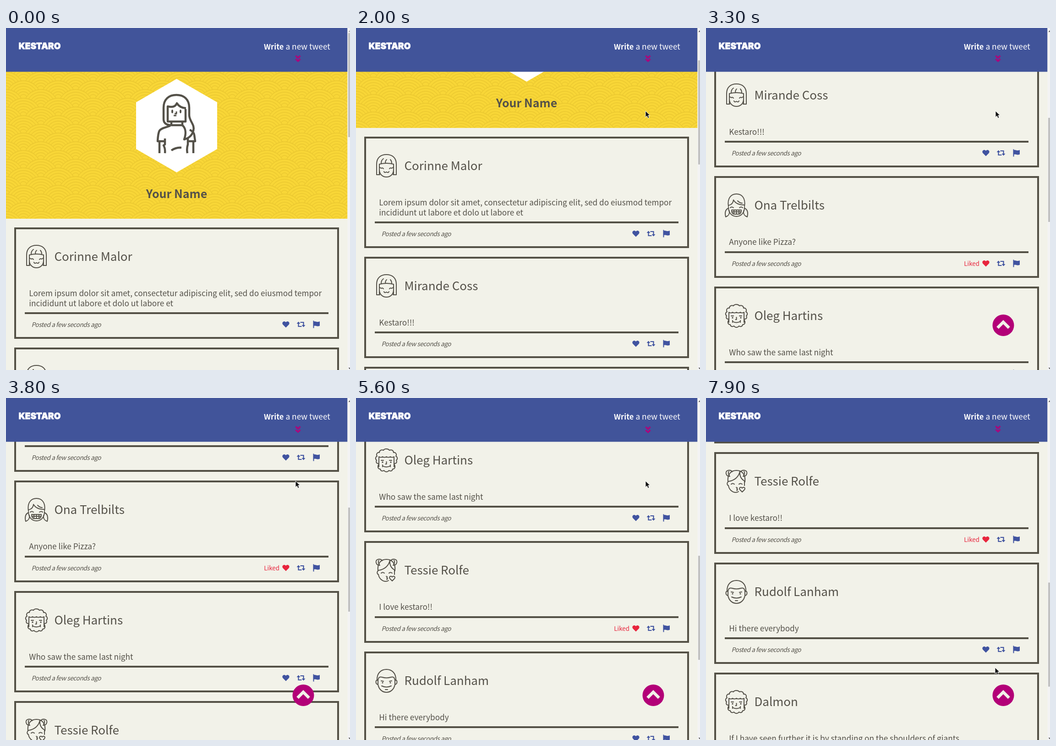
Animation of 751x746 px, one loop 8 s. Source, as an HTML page:

```html
<!DOCTYPE html>
<html lang="en">
<head>
<meta charset="utf-8">
<title>Kestaro</title>
<style>
  html, body { margin: 0; width: 100%; height: 100%; overflow: hidden; background: #f2f2e9; }
  svg { display: block; font-family: "Noto Sans CJK JP", "Noto Sans CJK SC", "Noto Sans CJK", "Source Sans Pro", "Noto Sans", sans-serif; }
  text { fill: #545149; }
  .ink { fill: none; stroke: #545149; stroke-width: 2; stroke-linecap: round; stroke-linejoin: round; }
  .dot { fill: #545149; stroke: none; }
  .bold { font-weight: 700; }
  .name { font-size: 25.95px; }
  .body { font-size: 17.23px; }
  .posted { font-size: 13.6px; font-style: italic; letter-spacing: -.4px; }
  .liked { font-size: 13.4px; fill: #e8253d; }
  .menu { font-size: 17.3px; fill: #fff; }
  .menu.bold { font-size: 16.4px; }
  .brand { font: 900 18.9px Inter, "DejaVu Sans", sans-serif; fill: #fff; stroke: #fff; stroke-width: .8; }
</style>
</head>
<body>
<svg width="751" height="746" viewBox="0 0 751 746">
  <defs>
    <pattern id="waves" width="76" height="38" y="96" patternUnits="userSpaceOnUse"></pattern>

    <g id="bob" class="ink">
      <path d="M11 45H4V22C4 8 13 1 25.500 1S47 8 47 22V45H40M10 45V22Q25.500 18 41 22V45"/>
      <path d="M10 34C10 44 17 50 25.500 50S41 44 41 34M14 20Q14 13 19 10M23 20Q23 14 26 12M37 20Q37 15 34 12"/>
      <path d="M11 29l3 2q3-2 5 1M40 29l-3 2q-3-2-5 1M20 38q1 4 5.500 1q4.500 3 5.500-1"/>
    </g>
    <g id="pigtails" class="ink">
      <path d="M8 28C5 10 14 1 25.500 1S46 10 43 28M8 30C8 43 16 50 25.500 50S43 43 43 30"/>
      <path d="M8 26Q18 24 19 14Q25 25 43 25M28 16q5 5 10 5"/>
      <path d="M8 32C1 35 0 43 2 51C8 49 11 44 10 38M43 32C50 35 51 43 49 51C43 49 40 44 41 38"/>
      <path d="M12 31q3-3 7 0M32 31q4-3 7 0"/>
      <path d="M15 36H36Q36 45 30 45H21Q15 45 15 36ZM15 40H36M20 36V44M25.500 36V45M31 36V44"/>
    </g>
    <g id="curly" class="ink">
      <path d="M8 33C3 33 2 29 4 26C0 22 2 18 5 17C2 12 6 8 10 9C10 4 15 2 19 4C21 0 29 0 32 4C36 2 41 4 41 9C45 8 49 12 46 17C49 18 51 22 47 26C49 29 48 33 43 33"/>
      <path d="M9 40V18q4 3 8 0q4 3 8.500 0q4 3 8.500 0q4 3 8 0V40"/>
      <path d="M9 34C5 40 7 45 12 45C13 50 17 50 20 48C23 52 28 52 31 48C34 50 38 50 39 45C44 45 46 40 42 34"/>
      <path d="M14 26h5M32 26h5M25.500 29v5h-2M17 38q8 5 17 0M17 36v4M34 36v4"/>
      <circle class="dot" cx="17" cy="30" r="1.700"/><circle class="dot" cx="35" cy="30" r="1.700"/>
    </g>
    <g id="buns" class="ink">
      <path d="M11 15C2 15 1 5 5 3C9 0 15 2 16 5M40 15C49 15 50 5 46 3C42 0 36 2 35 5M9 4q-3 4 1 9M42 4q3 4-1 9"/>
      <path d="M7 27C5 10 14 2 25.500 2S46 10 44 27M7 27C4 30 5 34 8 35C9 43 16 50 24 50Q27 50 30 48"/>
      <path d="M8 26C20 24 30 17 33 4C32 14 36 21 43 25V35"/>
      <path d="M14 32q3-3 7 0M31 32q3-3 7 0M25 39q4 1 1 3.500q4 1 0 3.500"/>
      <path d="M38 49l-5-5c-3-4 2-7 5-3.500c3-3.500 8-.5 5 3.500Z"/>
    </g>
    <g id="man" class="ink">
      <path d="M5 25C4 9 14 1 25.500 1S47 9 46 25M7 24C1 23 1 33 7 34C9 45 17 51 25.500 51S42 45 44 34C50 33 50 23 44 24"/>
      <path d="M7 34V25C8 17 12 17 16 18Q25.500 21 35 18C39 17 43 17 44 25V34"/>
      <path d="M14 26l5 1M37 26l-5 1M15 37Q25.500 42 36 37M23 45h5"/>
      <circle class="dot" cx="17" cy="30" r="1.600"/><circle class="dot" cx="34" cy="30" r="1.600"/>
    </g>

    <path id="heart" d="M0 7L-6.500 .5C-10-4-4.500-9.500 0-4.800C4.500-9.500 10-4 6.500 .5Z"/>
    <g id="repeat" fill="#4053a0">
      <path d="M-5.500-2V4.500H1.500M5.500 2V-4.500H-1.500" fill="none" stroke="#4053a0" stroke-width="2.200"/>
      <path d="M-9.500-1.500L-5.500-6L-1.500-1.500ZM9.500 1.500L5.500 6L1.500 1.500Z"/>
    </g>
    <path id="flag" fill="#4053a0" d="M-7-8h2v2C-2-8 1-3.500 7.500-6.500V3C2 6-1 1.500-5 3.500V8H-7Z"/>
  </defs>

  <rect width="751" height="746" fill="#f2f2e9"/>
  <g id="page">
    <rect y="95" width="745.500" height="321" fill="url(#waves)"/>
    <path d="M372.500 111L461 162V264L372.500 315L284 264V162Z" fill="#fff"/>
    <g class="ink" style="stroke-width:4.500;stroke-linecap:butt">
      <path d="M359 212C349 211 344 207 344 199V174C344 155 356 146 372 146S400 155 400 174V190C400 203 413 211 409 224Q405 239 389 243C394 229 392 218 385 212"/>
      <path d="M353 171V204H392V177M353 180V171Q369 175 373 164Q379 174 393 175M361 204V212H385V204"/>
      <path d="M359 213C349 217 339 218 335 224Q332 229 331 247H345M401 222Q410 226 411 233L413 247H399M335 247V273M347 241V254L344 256Q348 263 347 273M409 247V273M397 241V254Q394 263 396 273M361 267Q371 260 383 261"/>
      <path d="M372 182V187H368M366 191H372" style="stroke-width:3"/>
      <ellipse class="dot" cx="363" cy="182" rx="2" ry="4"/><ellipse class="dot" cx="381" cy="182" rx="2" ry="4"/>
    </g>
    <text class="bold" x="372.500" y="370.500" font-size="25" text-anchor="middle">Your Name</text>
    <g id="cards"></g>
  </g>

  <rect width="745.500" height="95.500" fill="#41549a"/>
  <text class="brand" x="27.500" y="45.500">KESTARO</text>
  <text class="menu bold" x="563" y="47">Write</text>
  <text class="menu" x="610.500" y="47">a new tweet</text>
  <path id="chevrons" d="M-5-5.500L0-1L5-5.500M-5 1.500L0 6L5 1.500" fill="none" stroke="#a8077d" stroke-width="3.600"/>

  <g id="toTop">
    <circle cx="649" cy="648.500" r="23.500" fill="#b30078"/>
    <path d="M636.500 654L649 641.500L661.500 654" fill="none" stroke="#f2f2e9" stroke-width="6.500"/>
  </g>

  <rect x="745.500" width="5.500" height="746" fill="#f3f3f3"/>
  <rect id="thumb" x="747" width="4" height="227" fill="#c1c1c1"/>
  <path id="arrowUp" d="M747.500 8.500L751 5V8.500Z"/>
  <path d="M747.500 741L751 744.500V741Z" fill="#505050"/>
  <path id="cursor" d="M0 0V13.500L3.200 10.700L5.400 15.600L8 14.500L5.800 9.600H10Z" fill="#111" stroke="#fff" stroke-width=".9"/>
</svg>
<script>
const LOOP = 8000, STEP = 100;
const $ = id => document.getElementById(id);

const posts = [
  ["Corinne Malor", "bob", ["Lorem ipsum dolor sit amet, consectetur adipiscing elit, sed do eiusmod tempor", "incididunt ut labore et dolo ut labore et"]],
  ["Mirande Coss", "bob", ["Kestaro!!!"]],
  ["Ona Trelbilts", "pigtails", ["Anyone like Pizza?"], true],
  ["Oleg Hartins", "curly", ["Who saw the same last night"]],
  ["Tessie Rolfe", "buns", ["I love kestaro!!"], true],
  ["Rudolf Lanham", "man", ["Hi there everybody"]],
  ["Dalmon", "curly", ["If I have seen further it is by standing on the shoulders of giants"]]
];

// Edges snap to whole pixels separately, as in page layout.
function card([name, face, lines, liked], exactTop) {
  const top = Math.round(exactTop);
  const rule = Math.round(exactTop + 165.4) - top + (lines.length - 1) * 22;
  const icon = (id, x, fill) => `<use href="#${id}" x="${x}" y="${rule + 24.5}" fill="${fill}"/>`;
  return `<g transform="translate(0 ${top})">
    <rect x="20" y="2" width="705" height="${rule + 52}" fill="none" stroke="#545146" stroke-width="4"/>
    <use href="#${face}" x="41" y="38"/>
    <text class="name" x="105.500" y="73">${name}</text>
    ${lines.map((line, i) => `<text class="body" x="50.300" y="${150 + i * 22}">${line}</text>`).join("")}
    <rect x="41" y="${rule - 2}" width="663" height="4" fill="#545146"/>
    <text class="posted" x="55.500" y="${rule + 30}">Posted a few seconds ago</text>
    ${liked ? `<text class="liked" x="563.200" y="${rule + 30}">Liked</text>` : ""}
    ${icon("heart", 611, liked ? "#e8253d" : "#4053a0")}
    ${icon("repeat", 644)}${icon("flag", 677.5)}
  </g>`;
}
$("cards").innerHTML = posts.map((post, i) =>
  card(post, i ? 697 + (i - 1) * 240.4 : 435)).join("");

// Overlapping scales: each row covers the lower half of the one above.
let scales = '<rect width="76" height="38" fill="#f8d637"/>';
for (let row = -1; row < 5; row++) {
  for (let x = row % 2 ? -38 : 0; x <= 114; x += 76) {
    for (let r = 38; r > 3; r -= 6) {
      scales += `<circle cx="${x}" cy="${row * 19}" r="${r}" fill="#f8d637" stroke="#ebc82f" stroke-width="1.300"/>`;
    }
  }
}
$("waves").innerHTML = scales;

const scrollKeys = [[1500, 0], [1800, 103], [2000, 198], [2800, 471], [3800, 757], [4800, 894], [6300, 1291], [6600, 1300]];
const cursorKeys = [[300, 685, 150], [900, 632, 181], [6900, 632, 181], [7200, 300, 330], [7400, 27, 480],
  [7600, 420, 550], [7700, 727, 530], [7900, 631, 588]];

function along(keys, t) {
  const next = keys.findIndex(key => key[0] > t);
  if (next < 0) return keys[keys.length - 1].slice(1);
  if (next === 0) return keys[0].slice(1);
  const a = keys[next - 1], b = keys[next], k = (t - a[0]) / (b[0] - a[0]);
  return a.slice(1).map((v, i) => v + (b[i + 1] - v) * k);
}

const move = (id, x, y) => $(id).setAttribute("transform", `translate(${x} ${y})`);

function render(t) {
  const scroll = Math.round(along(scrollKeys, t)[0]);
  const [x, y] = along(cursorKeys, t).map(Math.round);
  move("page", 0, -scroll);
  move("cursor", x, y);
  move("chevrons", 637.5, 67 + 1.6 * Math.cos(2 * Math.PI * (t / 1000 - .65)));
  $("thumb").setAttribute("y", 11 + scroll * .3012);
  $("arrowUp").setAttribute("fill", scroll ? "#505050" : "#a3a3a3");
  $("cursor").style.display = t < cursorKeys[0][0] ? "none" : "";
  $("toTop").style.display = scroll > 600 ? "" : "none";
}

const start = performance.now();
function tick() {
  const t = (performance.now() - start) % LOOP;
  render(Math.floor(t / STEP) * STEP);
  requestAnimationFrame(tick);
}
tick();
</script>
</body>
</html>
```
